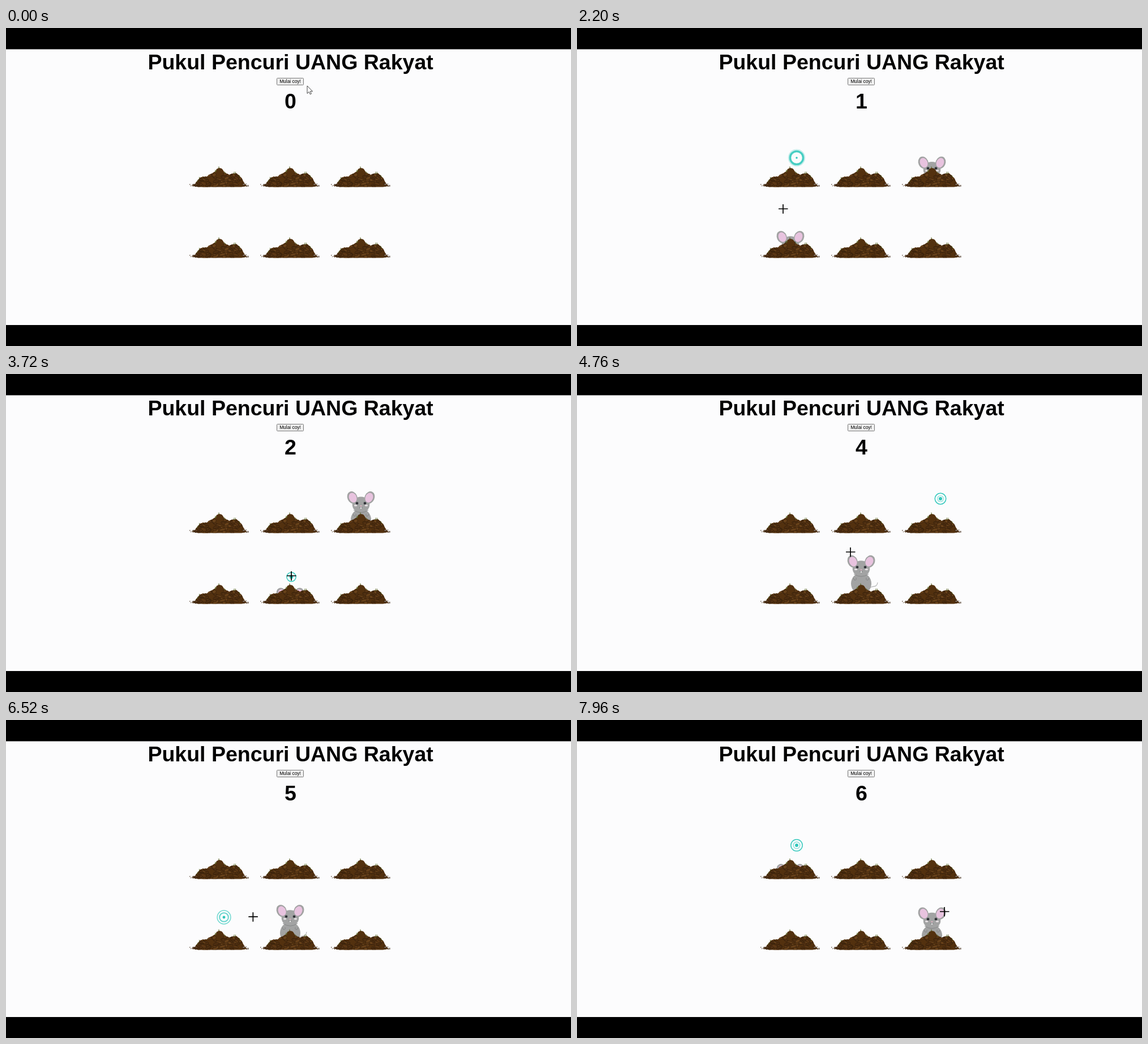
Recreate the animation shown at these times as an HTML page. Size 998 px wide and 561 px high, loop 8000 ms.

```html
<!DOCTYPE html>
<html lang="id">
<head>
<meta charset="utf-8">
<title>Pukul Pencuri UANG Rakyat</title>
<style>
  html, body { margin: 0; width: 100%; height: 100%; overflow: hidden; background: #000; }
  svg { display: block; width: 100%; height: 100%; }
  text { font-family: "Liberation Sans", Arial, sans-serif; text-anchor: middle; }
  .big { font-weight: bold; font-size: 37.5px; }
</style>
</head>
<body>
<svg viewBox="0 0 998 561">
  <defs>
    <clipPath id="hole"><rect x="-62" y="-110" width="124" height="107"/></clipPath>
    <path id="outline"/>
    <clipPath id="soil"><use href="#outline"/></clipPath>
    <g id="mound">
      <use href="#outline" fill="#53310f"/>
      <g id="clods" clip-path="url(#soil)"/>
      <g id="crumbs"/>
      <g id="grass" stroke="#5d6b2a" stroke-width=".9"/>
    </g>
    <g id="ear" transform="rotate(-24 -15.2 -76)">
      <ellipse cx="-15.2" cy="-76" rx="8.8" ry="11.2" fill="#a2a3a3"/>
      <ellipse cx="-14.6" cy="-75.5" rx="6.6" ry="8.8" fill="#e8c3df"/>
    </g>
    <g id="side">
      <use href="#ear"/>
      <circle cx="-7" cy="-66" r="3" fill="#858789"/>
      <circle cx="-7" cy="-66" r="2" fill="#292a30"/>
      <ellipse cx="-9.4" cy="-62" rx="2.8" ry="1.6" fill="#e5dfe2"/>
      <path d="M-14 -47q1 5 4 4q2 -1 1 -4" fill="none" stroke="#858687"/>
    </g>
    <g id="mouse">
      <path d="M14 -29C20 -34 28 -29 29 -39" fill="none" stroke="#b2b3b4" stroke-width="1.2"/>
      <ellipse cy="-37" rx="18" ry="19" fill="#a2a3a3"/>
      <ellipse cy="-63.5" rx="15.3" ry="14" fill="#a2a3a3"/>
      <path d="M-13 -54Q0 -45 13 -54" fill="none" stroke="#858687"/>
      <use href="#side"/><use href="#side" transform="scale(-1 1)"/>
      <path d="M-2 -62h4l-2 2.2z" fill="#eab2c4"/>
      <path d="M-3 -59q1.5 1.5 3 0q1.5 1.5 3 0" fill="none" stroke="#77797b" stroke-width=".7"/>
      <rect x="-1" y="-58.5" width="2" height="2" fill="#f6f6f6"/>
    </g>
  </defs>

  <rect width="998" height="561"/>
  <rect y="37.5" width="998" height="486.5" fill="#fcfcfd"/>
  <text class="big" x="502.6" y="73">Pukul Pencuri UANG Rakyat</text>
  <rect id="button" x="478.5" y="88.5" width="47" height="12" rx="1" stroke="#777"/>
  <text x="502" y="97.3" font-size="8.4">Mulai coy!</text>
  <text id="score" class="big" x="502.4" y="141.5">0</text>
  <g id="field"/>
  <g id="ripples" fill="none" stroke="#30c7bb"/>
  <path id="arrow" d="M0 0V13.5L3.2 10.6L5.3 15L7.4 14L5.4 9.8H9.5Z" fill="#fff" stroke="#333" stroke-width=".9"/>
  <path id="cross" d="M-8 0H8.5M0 -8V8.5" stroke="#000" stroke-width="1.7"/>
</svg>

<script>
const LOOP = 8000, RISE = 1000, DEPTH = 72;
const HOLD = 180, RIPPLE = 850, RIPPLE_LAG = 100;
const $ = id => document.getElementById(id);
const clamp = v => Math.max(0, Math.min(1, v));

function add(parent, tag, attrs) {
  const el = document.createElementNS("http://www.w3.org/2000/svg", tag);
  set(el, attrs);
  parent.appendChild(el);
  return el;
}
function set(el, attrs) {
  for (const k in attrs) el.setAttribute(k, attrs[k]);
}

let seed = 17;
const rnd = () => (seed = seed * 16807 % 2147483647) / 2147483647;
const between = (a, b) => a + (b - a) * rnd();
const pick = list => list[Math.floor(rnd() * list.length)];

// Heap profile: a broad slope with a peak and two shoulders
function heapHeight(x) {
  const bump = (at, height, spread) => height - (x - at) ** 2 / spread;
  const slope = 30 * Math.max(0, 1 - Math.abs(x) / 50) ** .85;
  return Math.max(slope, bump(0, 33.5, 8), bump(26, 24, 18), bump(-28, 18, 16));
}

function buildHeap() {
  let d = "M-37 0";
  for (let x = -49; x <= 50; x += 2) d += `L${x} ${-1.5 - heapHeight(x) + between(0, 1.6)}`;
  set($("outline"), { d: d + "L39 0Z" });

  for (let i = 0; i < 70; i++) {
    const x = between(-46, 48), y = -between(0, 1) * heapHeight(x);
    add($("clods"), "ellipse", {
      rx: between(3, 6), ry: between(1.5, 3.2),
      transform: `translate(${x} ${y}) rotate(${between(-40, 40)})`,
      fill: pick(["#664019", "#5a3614", "#4e2e10"]), stroke: "#38210c", "stroke-width": .8
    });
  }
  for (let i = 0; i < 26; i++) {
    const side = i % 2 ? 1 : -1;
    add($("crumbs"), "ellipse", {
      cx: side * between(40, 53), cy: between(-6, -1), rx: between(.5, 1.5), ry: between(.4, .9),
      fill: pick(["#3f2a18", "#6a5542", "#a39a92"])
    });
  }
  for (let i = 0; i < 9; i++) {
    const x = between(-44, 46);
    add($("grass"), "path", { d: `M${x} ${1 - heapHeight(x)}l${between(-2, 2)} -4` });
  }
}
buildHeap();

// Holes run left to right, top row first
const mice = [];
for (let i = 0; i < 6; i++) {
  const x = 377 + i % 3 * 125, y = i < 3 ? 280.5 : 405.5;
  const spot = add($("field"), "g", { transform: `translate(${x} ${y})` });
  const win = add(spot, "g", { "clip-path": "url(#hole)" });
  mice.push(add(win, "use", { href: "#mouse" }));
  add(spot, "use", { href: "#mound" });
}

// One mouse is out at a time: hole, time it starts to rise
const turns = [[0, 880], [3, 1300], [2, 1887], [4, 2570], [2, 3210], [4, 3930],
  [3, 4940], [4, 5900], [0, 6760], [5, 7425]];

// Pointer stops: time, x, y and, for a click, the points it earns
const stops = [[0, 532, 102], [280, 514, 90], [880, 514, 90, 0], [1420, 388, 229, 1],
  [2200, 364, 319], [2450, 385, 348], [3240, 504, 358, 1], [3720, 504, 356],
  [4200, 642, 220, 2], [4760, 483, 314], [5060, 494, 358, 0], [5760, 399, 349],
  [5860, 385, 348, 1], [7160, 515, 346], [7380, 388, 221, 1], [7960, 649, 338]];
const clicks = stops.filter(s => s.length > 3);

// CSS "ease" timing curve
function ease(x) {
  if (x <= 0) return 0;
  if (x >= 1) return 1;
  const bez = (u, a, b) => 3 * (1 - u) ** 2 * u * a + 3 * (1 - u) * u * u * b + u ** 3;
  let lo = 0, hi = 1;
  for (let i = 0; i < 24; i++) {
    const mid = (lo + hi) / 2;
    if (bez(mid, .25, .25) < x) lo = mid; else hi = mid;
  }
  return bez(lo, .1, 1);
}

function pointerAt(t) {
  const next = stops.findIndex(s => s[0] > t);
  if (next < 0) return stops[stops.length - 1].slice(1, 3);
  const [a, b] = [stops[next - 1], stops[next]];
  const leave = a[0] + (a.length > 3 ? Math.min(HOLD, (b[0] - a[0]) / 3) : 0);
  const k = clamp((t - leave) / (b[0] - leave));
  const s = k * k * (3 - 2 * k);
  return [a[1] + (b[1] - a[1]) * s, a[2] + (b[2] - a[2]) * s];
}

const ripples = clicks.map(([time, x, y]) => {
  const g = add($("ripples"), "g", { transform: `translate(${x} ${y})` });
  const outer = add(g, "circle", { "stroke-width": 1.5 });
  const inner = add(g, "circle", {});
  const dot = add(g, "circle", { fill: "#30c7bb", stroke: "none" });
  return { start: time + RIPPLE_LAG, g, outer, inner, dot };
});

function drawRipple({ start, g, outer, inner, dot }, t) {
  const k = (t - start) / RIPPLE;
  const shown = k >= 0 && k < 1;
  set(g, { display: shown ? "inline" : "none" });
  if (!shown) return;
  set(g, { opacity: clamp(3 * k) * clamp(6 * (1 - k)) });
  set(outer, { r: 18 * k, opacity: clamp(2.6 - 2.9 * k) });
  set(inner, { r: 18 * k * k, "stroke-width": 7 * k ** 3, opacity: clamp(1.1 * k) });
  set(dot, { r: Math.min(3, 5 * (1.15 - k)) });
}

function draw(t) {
  const out = Array(6).fill(0);
  turns.forEach(([hole, up], i) => {
    const down = turns[i + 1]?.[1] ?? LOOP;
    out[hole] += ease((t - up) / RISE) - ease((t - down) / RISE);
  });
  mice.forEach((m, i) => set(m, { y: DEPTH * (1 - clamp(out[i])) }));

  $("score").textContent = clicks.reduce((sum, [time, , , gain]) => sum + (t >= time ? gain : 0), 0);
  set($("button"), { fill: t >= 520 && t < 920 ? "#f5f5f5" : "#efefef" });
  ripples.forEach(r => drawRipple(r, t));

  const [x, y] = pointerAt(t);
  const aiming = t > 900 && y > 108;
  const transform = `translate(${x} ${y})`;
  set($("arrow"), { transform, display: aiming ? "none" : "inline" });
  set($("cross"), { transform, display: aiming ? "inline" : "none" });
}

const begin = performance.now();
function tick() {
  draw((performance.now() - begin) % LOOP);
  requestAnimationFrame(tick);
}
tick();
</script>
</body>
</html>
```
